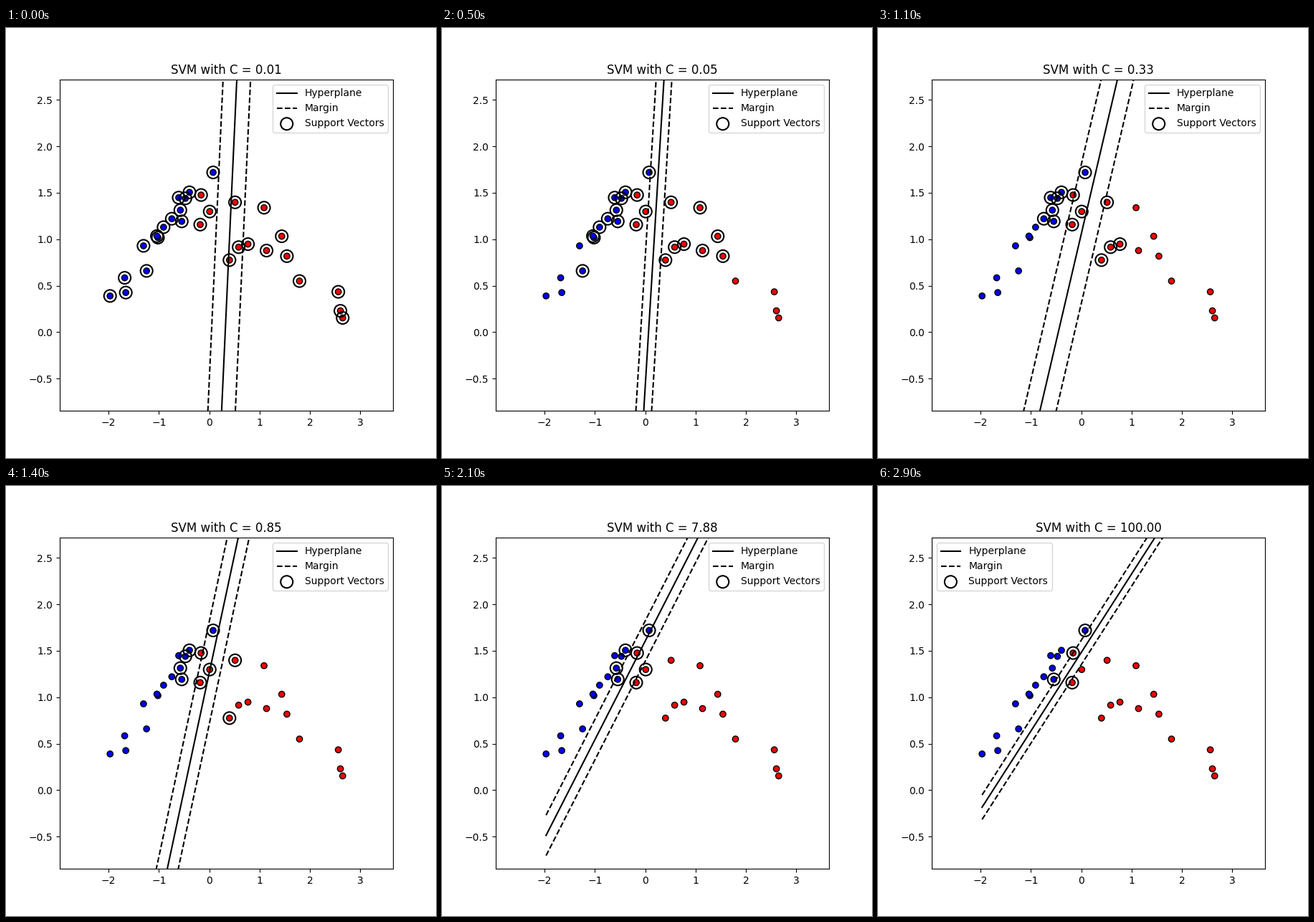
A matplotlib script that plays this animation: 600x600 px, repeating every 3000 ms.

```python
import numpy as np
import matplotlib.pyplot as plt
from matplotlib.animation import FuncAnimation

FRAMES = 30
POINTS = 30
C_VALUES = np.logspace(-2, 2, FRAMES)


def make_classes(n, seed):
    """Two sheared Gaussian clusters on corners of a square, shuffled."""
    rng = np.random.RandomState(seed)
    corners = rng.permutation(4)[:2]
    points = rng.standard_normal((n, 2))
    labels = np.repeat([-1.0, 1.0], n // 2)
    for label, corner in zip((-1, 1), corners):
        shear = 2 * rng.uniform(size=(2, 2)) - 1
        centre = 2 * np.array(divmod(corner, 2)) - 1
        points[labels == label] = points[labels == label] @ shear + centre
    rng.uniform(size=n)  # label-noise draw, too rare to flip any label here
    order = np.arange(n)
    rng.shuffle(order)
    return points[order], labels[order]


X, y = make_classes(POINTS, seed=42)
K = X @ X.T
DIAG = np.diag(K)


def movable(alpha, C):
    """Masks of the points whose signed weight can still rise or fall."""
    above, below = alpha > 1e-9 * C, alpha < (1 - 1e-9) * C
    return np.where(y > 0, below, above), np.where(y > 0, above, below)


def fit_svm(C, tol=1e-4, max_iter=8000):
    """Linear soft-margin SVM by SMO with second-order pair selection."""
    alpha = np.zeros(len(y))
    score = y.copy()  # label minus the unbiased decision value
    for _ in range(max_iter):
        up, low = movable(alpha, C)
        i = np.argmax(np.where(up, score, -np.inf))
        gap = np.where(low, score[i] - score, -np.inf)
        if gap.max() < tol:
            break
        curve = np.maximum(K[i, i] + DIAG - 2 * K[i], 1e-12)
        j = np.argmax(np.where(gap > 0, gap ** 2 / curve, -np.inf))
        room_i = C - alpha[i] if y[i] > 0 else alpha[i]
        room_j = alpha[j] if y[j] > 0 else C - alpha[j]
        step = min(gap[j] / curve[j], room_i, room_j)
        alpha[i] += y[i] * step
        alpha[j] -= y[j] * step
        score -= step * (K[i] - K[j])

    up, low = movable(alpha, C)
    free = up & low
    if free.any():
        b = score[free].mean()
    else:
        b = (score[up].max() + score[low].min()) / 2
    return (alpha * y) @ X, b, alpha > 1e-9 * C


FITS = [fit_svm(C) for C in C_VALUES]
LOW, HIGH = X.min(axis=0), X.max(axis=0)

fig, ax = plt.subplots(figsize=(6, 6), dpi=100)


def draw(k):
    w, b, support = FITS[k]
    xx = np.linspace(LOW[0], HIGH[0])
    yy = -(w[0] * xx + b) / w[1]
    margin = 1 / np.hypot(*w)

    ax.clear()
    ax.scatter(X[:, 0], X[:, 1], c=y, cmap="bwr", edgecolors="k")
    ax.plot(xx, yy, "k-", label="Hyperplane")
    ax.plot(xx, yy - margin, "k--", label="Margin")
    ax.plot(xx, yy + margin, "k--")
    ax.scatter(X[support, 0], X[support, 1], s=150, facecolors="none",
               edgecolors="k", linewidths=1.5, label="Support Vectors")
    ax.set_xlim(LOW[0] - 1, HIGH[0] + 1)
    ax.set_ylim(LOW[1] - 1, HIGH[1] + 1)
    ax.set_title(f"SVM with C = {C_VALUES[k]:.2f}")
    ax.legend(loc="best")


anim = FuncAnimation(fig, draw, frames=FRAMES, interval=100, repeat=True)
plt.show()
```
